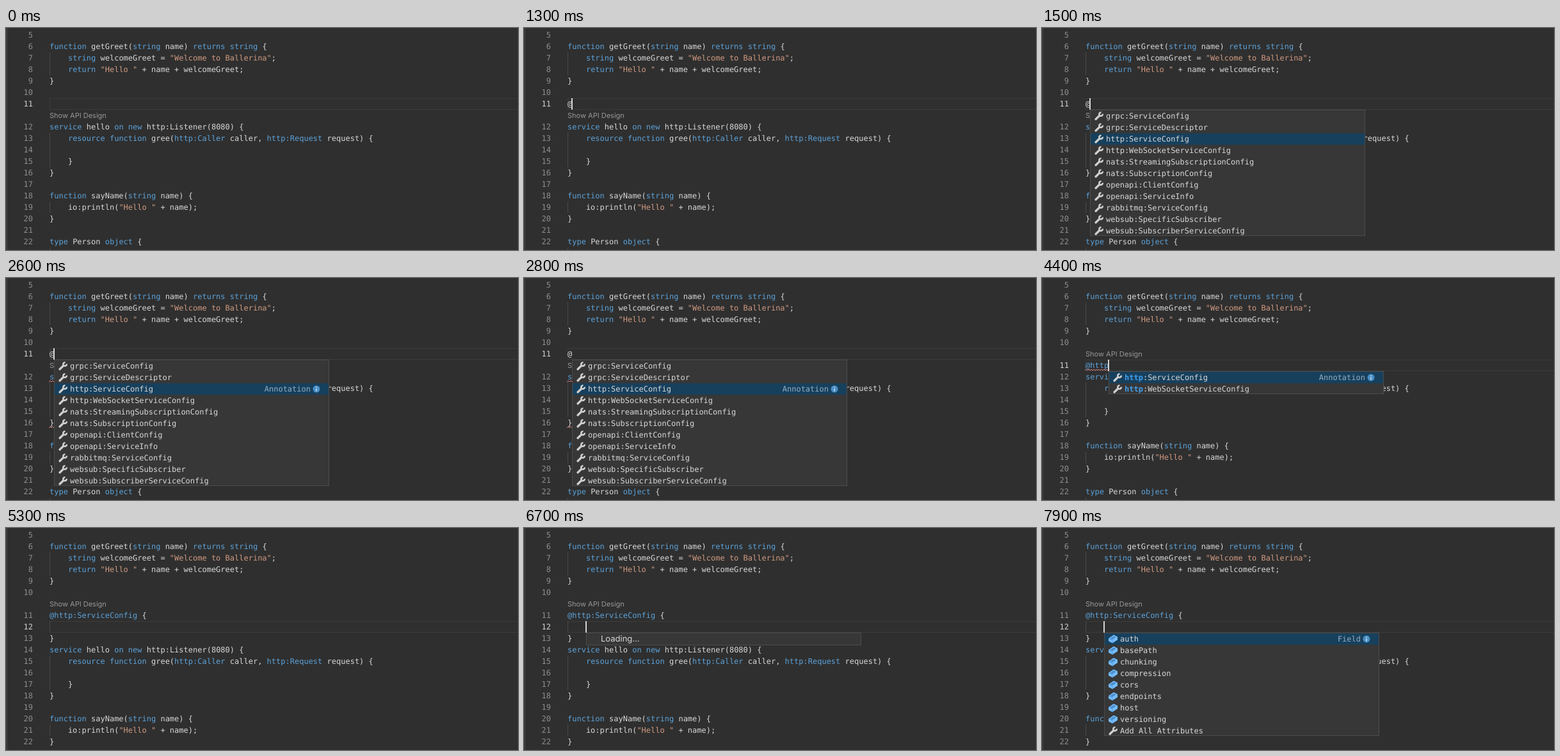
Write an HTML page that moves like this. It is 800 by 348 pixels and loops after 8 s.

```html
<!DOCTYPE html>
<html lang="en">
<head>
<meta charset="utf-8">
<title>Code completion</title>
<style>
  html, body { margin: 0; width: 100%; height: 100%; overflow: hidden; background: #2f2f2f; }
  #stage {
    position: relative; width: 800px; height: 348px; overflow: hidden;
    background: #2f2f2f; color: #d8d8d8;
    font: 12px/18px "DejaVu Sans Mono", monospace;
    text-rendering: geometricPrecision; white-space: pre;
  }
  #stage div, #stage svg { position: absolute; box-sizing: border-box; }
  .edge { left: 1px; top: 0; width: 1px; height: 348px; background: #464646; }
  .num { left: 0; width: 42px; text-align: right; color: #8e8e8e; }
  .num.on { color: #d2d2d2; }
  .code { left: 68px; }
  .lens { left: 68px; font: 11px/19px Inter, sans-serif; color: #989898; }
  .guide { left: 68px; width: 1px; height: 18px; background: #4b4b4b; }
  .line { left: 68px; width: 740px; height: 18px; border: 1px solid #3c3c3c; }
  .caret { width: 2px; height: 18px; background: #d4d4d4; }
  .k { color: #5ca2d9; }
  .s { color: #d09a82; }
  .pop { width: 430px; background: #373737; border: 1px solid #4c4c4c; overflow: hidden; }
  .item { left: 0; width: 428px; height: 18px; }
  .item.on { background: #17405d; }
  .item svg { left: 6px; top: 2px; }
  .item .label { left: 24px; }
  .item b { color: #3f9fee; }
  .item .kind { right: 28px; color: #93aec1; }
  .item .info { left: 403px; top: 3px; }
  .wait { left: 22px; font: 13px/19px Inter, sans-serif; }
</style>
</head>
<body>
<div id="stage"></div>
<script>
const LOOP = 8000, ROW = 18, TOP = 2, LEFT = 68, CH = 7.2246;
const stage = document.getElementById('stage');

const HEAD = [
  '',
  'function getGreet(string name) returns string {',
  '    string welcomeGreet = "Welcome to Ballerina";',
  '    return "Hello " + name + welcomeGreet;',
  '}',
  ''
];
const TAIL = [
  'service hello on new http:Listener(8080) {',
  '    resource function gree(http:Caller caller, http:Request request) {',
  '    ',
  '    }',
  '}',
  '',
  'function sayName(string name) {',
  '    io:println("Hello " + name);',
  '}',
  '',
  'type Person object {',
  '    '
];
const LENS = null;

const ANNOTATIONS = [
  'grpc:ServiceConfig', 'grpc:ServiceDescriptor', 'http:ServiceConfig',
  'http:WebSocketServiceConfig', 'nats:StreamingSubscriptionConfig',
  'nats:SubscriptionConfig', 'openapi:ClientConfig', 'openapi:ServiceInfo',
  'rabbitmq:ServiceConfig', 'websub:SpecificSubscriber',
  'websub:SubscriberServiceConfig'
];
const FIELDS = ['auth', 'basePath', 'chunking', 'compression', 'cors',
  'endpoints', 'host', 'versioning', 'Add All Attributes'];

// Event times in ms
const TYPED = [[1300, '@'], [2900, '@h'], [3000, '@ht'], [3100, '@htt'], [3200, '@http']];
const BLINK = [100, 600, 1100, 1800, 2300, 2800, 2900, 3700, 4200,
  5000, 5500, 6000, 6500, 7000, 7500];
const LIST = 1500, CHECK = 2000, LENS_UP = 4000, ACCEPT = 4500, ASK = 6600, ANSWER = 6800;

const WRENCH = `<svg width="14" height="14" fill="none" stroke="#d0d0d0">
  <path d="M2 12L7.6 6.5" stroke-width="3.2" stroke-linecap="round"/>
  <path d="M10.5 1.5A2.7 2.7 0 1 0 12.7 3.7" stroke-width="2.6"/></svg>`;
const BRICK = `<svg width="14" height="14">
  <path d="M0 6L8 .6L14 3.6V8.2L6 13.4L0 10.2Z" fill="#75beff"/>
  <path d="M2 6.2L8 2.2L12 4L6.1 8.1Z" fill="#4d8fca"/>
  <path d="M0 6L6 9V13.4" fill="none" stroke="#4d8fca" stroke-width=".7"/></svg>`;
const INFO = `<svg class="info" style="left:403px;top:3px" width="12" height="12">
  <circle cx="6" cy="6" r="5.5" fill="#4a8fc6"/>
  <path d="M6 2.6V4M6 5.2V9.4" stroke="#d3e4f0" stroke-width="1.4"/></svg>`;

const TOKENS = /"[^"]*"|@[\w:]+|http:(?:Caller|Request)\b|\b(?:function|string|returns|return|service|on|new|resource|type|object)\b/g;
const paint = text => text.replace(TOKENS, m =>
  `<span class="${m[0] === '"' ? 's' : 'k'}">${m}</span>`);

const box = (cls, top, html = '', style = '') =>
  `<div class="${cls}" style="top:${top}px;${style}">${html}</div>`;
const rowTop = i => TOP + i * ROW;

function squiggle(row, chars) {
  const w = Math.round(chars * CH);
  let d = 'M0 3';
  for (let x = 2; x <= w + 1; x += 2) d += `L${x} ${x % 4 ? 1 : 3}`;
  return `<svg style="left:${LEFT - 1}px;top:${rowTop(row) + 14}px" width="${w + 1}" height="4">
    <path d="${d}" fill="none" stroke="#d98080"/></svg>`;
}

function popup(left, top, items, picked, kind, info, prefix = '') {
  const rows = items.map((name, i) => {
    const icon = kind === 'Field' && i < items.length - 1 ? BRICK : WRENCH;
    const label = prefix ? `<b>${prefix}</b>${name.slice(prefix.length)}` : name;
    const extra = i === picked && info ? box('kind', 0, kind) + INFO : '';
    return box(i === picked ? 'item on' : 'item', i * ROW,
      icon + box('label', 0, label) + extra);
  });
  return box('pop', top, rows.join(''), `left:${left}px;height:${items.length * ROW}px`);
}

function draw(t) {
  const done = t >= ACCEPT, up = t >= LENS_UP;
  const typed = TYPED.reduce((s, [at, text]) => t >= at ? text : s, '');
  const middle = done ? [LENS, '@http:ServiceConfig {', '    ', '}']
    : up ? [LENS, typed] : [typed, LENS];
  const rows = [...HEAD, ...middle, ...TAIL].slice(0, 20);
  const cur = done ? 8 : up ? 7 : 6;
  const col = done ? 4 : typed.length;

  let html = box('edge', 0) + box('line', rowTop(cur));
  let num = 5;
  rows.forEach((text, i) => {
    const y = rowTop(i);
    if (text === LENS) {
      html += box('lens', y, 'Show API Design');
      return;
    }
    html += box(i === cur ? 'num on' : 'num', y, num++) + box('code', y, paint(text));
    if (text.startsWith('    ')) html += box('guide', y);
  });

  if (t >= CHECK && !up) html += squiggle(8, 1) + squiggle(12, 1);
  if (up && !done) html += squiggle(7, 5);

  const x = LEFT + col * CH, below = rowTop(cur + 1), left = Math.round(x);
  if (t >= LIST && !done) {
    const prefix = typed.slice(1);
    const items = ANNOTATIONS.filter(s => s.startsWith(prefix));
    html += popup(left, below, items, prefix ? 0 : 2, 'Annotation', t >= CHECK, prefix);
  }
  if (t >= ANSWER) html += popup(left, below, FIELDS, 0, 'Field', true);
  else if (t >= ASK) {
    html += box('pop', below, box('wait', 0, 'Loading...'), `left:${left}px;height:20px`);
  }

  if (BLINK.filter(at => t >= at).length % 2) {
    html += box('caret', rowTop(cur), '', `left:${Math.max(LEFT, Math.round(x - 1))}px`);
  }
  stage.innerHTML = html;
}

let shown = -1;
const start = performance.now();
function tick() {
  const step = Math.floor((performance.now() - start) % LOOP / 100);
  if (step !== shown) draw((shown = step) * 100);
  requestAnimationFrame(tick);
}
tick();
</script>
</body>
</html>
```
